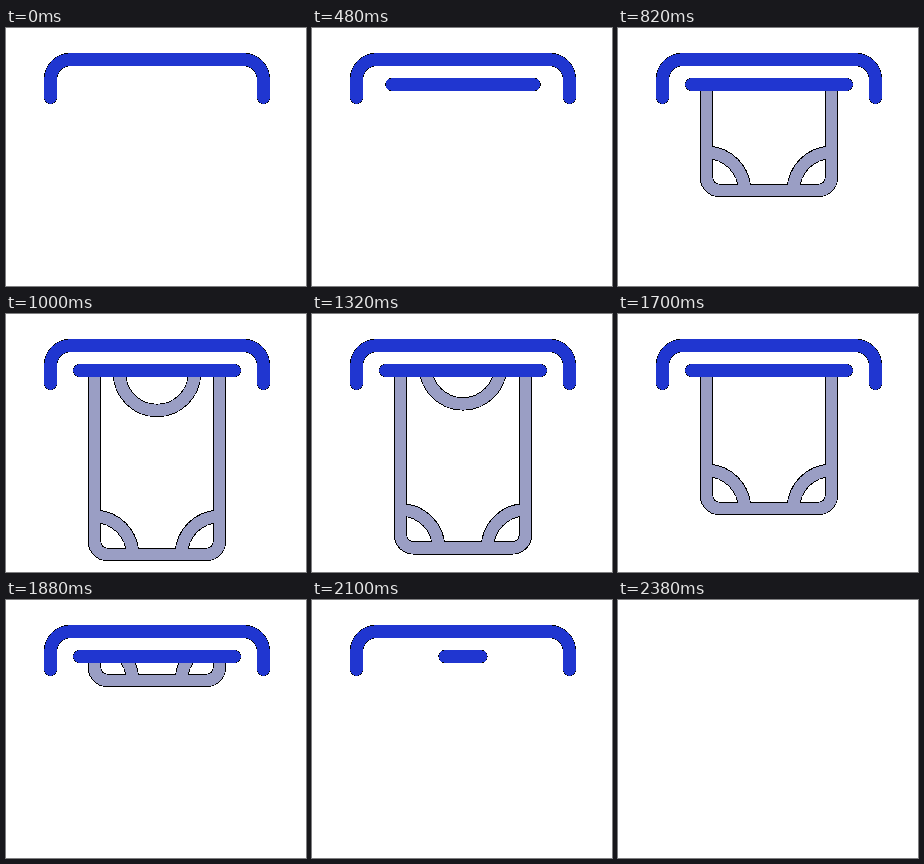
Animation, 300 px wide and 258 px high, one loop 2.4 s. Source, as an HTML page:

```html
<!DOCTYPE html>
<html lang="en">
<head>
<meta charset="utf-8">
<title>Cash dispenser</title>
<style>
  html, body { margin: 0; width: 100%; height: 100%; overflow: hidden; background: #fff; }
  svg { display: block; width: 100%; height: 100%; }
  path, circle { fill: none; shape-rendering: crispEdges; }
  .edge { stroke: #000; stroke-width: 13.4; }
  .blue { stroke-linecap: round; }
  .blue .ink { stroke: #2036d0; stroke-width: 12.5; }
  .note .ink { stroke: #9a9ec4; stroke-width: 11.7; }
</style>
</head>
<body>
<svg viewBox="0 0 300 258">
  <defs>
    <clipPath id="slot"><rect x="0" y="57" width="300" height="201"/></clipPath>
    <!-- y = 0 is the lower edge of the note -->
    <g id="noteShape">
      <path d="M88.5 -260V-19.5a13 13 0 0 0 13 13H200.500a13 13 0 0 0 13 -13V-260"/>
      <path d="M88.5 -44.5a38 38 0 0 1 38 38M213.500 -44.5a38 38 0 0 0 -38 38"/>
      <circle cx="151" cy="-188" r="37.5"/>
    </g>
    <path id="frameShape" d="M44.500 69.500V51.500a20 20 0 0 1 20 -20H237.500a20 20 0 0 1 20 20V69.500"/>
    <path id="barShape"/>
  </defs>
  <g id="scene">
    <g clip-path="url(#slot)">
      <g id="note" class="note">
        <use href="#noteShape" class="edge"/>
        <use href="#noteShape" class="ink"/>
      </g>
    </g>
    <g id="bar" class="blue">
      <use href="#barShape" class="edge"/>
      <use href="#barShape" class="ink"/>
    </g>
    <g class="blue">
      <use href="#frameShape" class="edge"/>
      <use href="#frameShape" class="ink"/>
    </g>
  </g>
</svg>
<script>
  const LOOP = 2400, STEP = 20;
  const el = id => document.getElementById(id);
  const scene = el('scene'), note = el('note'), bar = el('bar'), barShape = el('barShape');

  // time, lower edge of the note, speed in px per ms
  const slide = [
    [720, 57, 1.35], [820, 169, 0.85], [1000, 247, 0.1], [1060, 249.5, 0],
    [1320, 240.4, -0.05], [1700, 201, -0.24], [1880, 87, -1.2], [1900, 57, -1.5]
  ];

  function noteEdge(t) {
    const i = slide.findIndex(p => p[0] > t);
    if (i < 1) return 57;
    const [t0, y0, v0] = slide[i - 1], [t1, y1, v1] = slide[i];
    const d = t1 - t0, s = (t - t0) / d, r = 1 - s;
    return r * r * ((1 + 2 * s) * y0 + s * d * v0) + s * s * ((3 - 2 * s) * y1 - r * d * v1);
  }

  const ease = (t, a, b) => {
    const s = Math.min(1, Math.max(0, (t - a) / (b - a)));
    return s * s * (3 - 2 * s);
  };

  const show = (node, on) => node.setAttribute('visibility', on ? 'visible' : 'hidden');

  function draw(t) {
    scene.style.display = t < 2380 ? '' : 'none';
    show(note, t > 720 && t < 1900);
    note.setAttribute('transform', `translate(0 ${noteEdge(t).toFixed(2)})`);
    show(bar, t >= 220 && t < 2200);
    const half = 77.5 * ease(t, 200, 540) * (1 - ease(t, 1880, 2200));
    barShape.setAttribute('d', `M${151 - half} 56.5H${151 + half + 0.01}`);
  }

  const start = performance.now();
  function tick() {
    const t = (performance.now() - start) % LOOP;
    draw(Math.floor(t / STEP) * STEP);
    requestAnimationFrame(tick);
  }
  tick();
</script>
</body>
</html>
```
